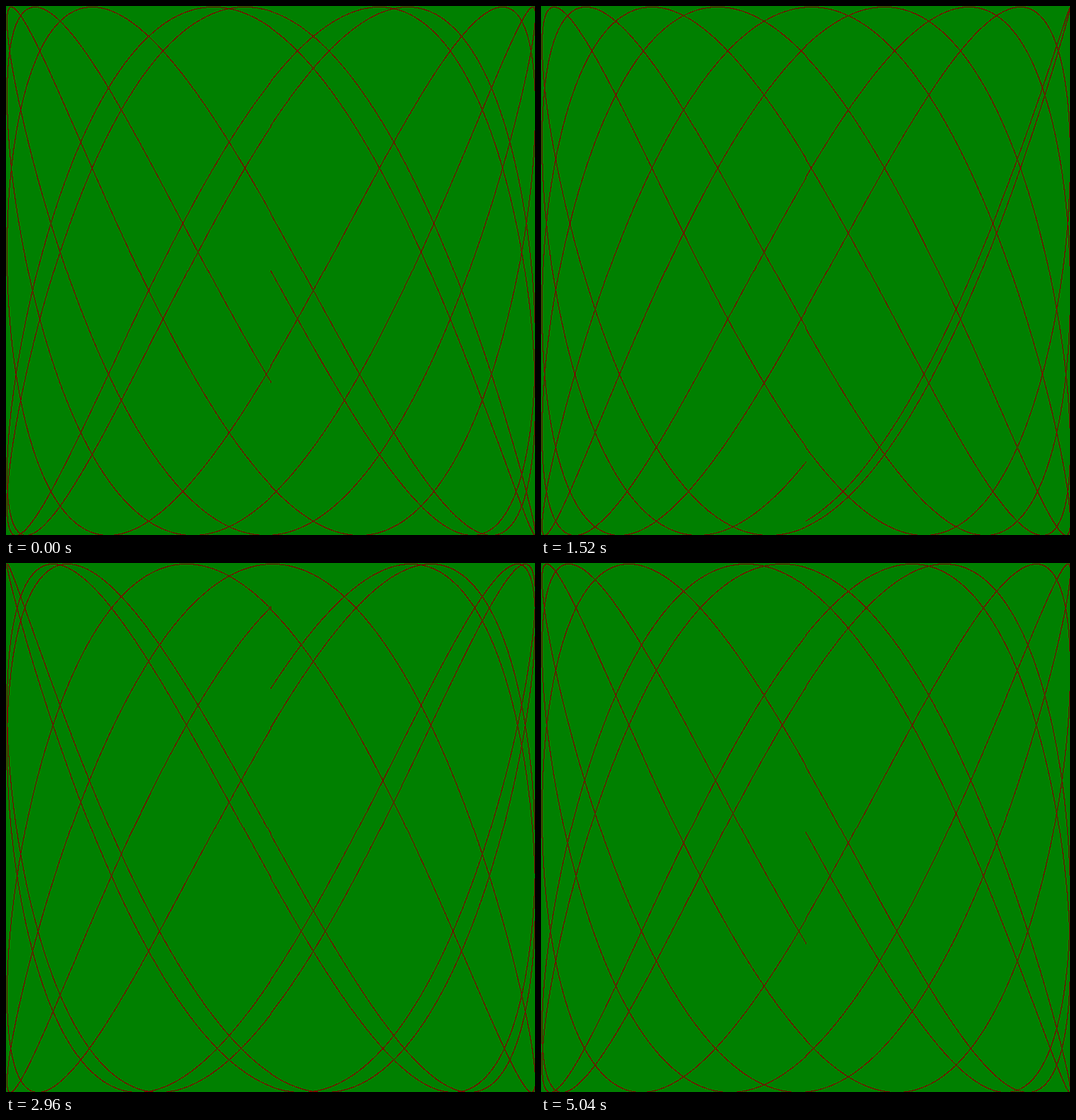
An HTML page with a canvas that plays this animation: 748 px wide and 748 px high, repeating every 5.12 s.

```html
<!DOCTYPE html>
<html lang="en">
<head>
<meta charset="utf-8">
<title>Lissajous</title>
<style>
  html, body { margin: 0; width: 100%; height: 100%; overflow: hidden; background: #008000; }
  canvas { display: block; width: 748px; height: 748px; image-rendering: pixelated; }
</style>
</head>
<body>
<canvas id="stage" width="748" height="748"></canvas>
<script>
  const SIZE = 374, SIDE = SIZE * 2;
  const CYCLES = 5, RES = 0.001, FREQ = 1.81393;
  const STEPS = 64, STEP_MS = 80, PHASE_STEP = 0.1;
  // ABGR byte order
  const GREEN = 0xff008000, RED = 0xff000080;

  const ctx = document.getElementById("stage").getContext("2d");
  const image = ctx.createImageData(SIDE, SIDE);
  const pixels = new Uint32Array(image.data.buffer);

  // Rounds toward zero after the half offset, so the plot is slightly asymmetric.
  const toPixel = v => SIZE + Math.trunc(v * SIZE + 0.5);

  function draw(phase) {
    pixels.fill(GREEN);
    for (let t = 0; t < CYCLES * 2 * Math.PI; t += RES) {
      const x = toPixel(Math.sin(t));
      const y = toPixel(Math.sin(t * FREQ + phase));
      if (x < SIDE && y < SIDE) pixels[y * SIDE + x] = RED;
    }
    ctx.putImageData(image, 0, 0);
  }

  let shown = -1;
  const start = performance.now();

  function tick() {
    const elapsed = Math.max(0, performance.now() - start);
    const step = Math.floor(elapsed / STEP_MS) % STEPS;
    if (step !== shown) {
      shown = step;
      draw(step * PHASE_STEP);
    }
    requestAnimationFrame(tick);
  }
  tick();
</script>
</body>
</html>
```
